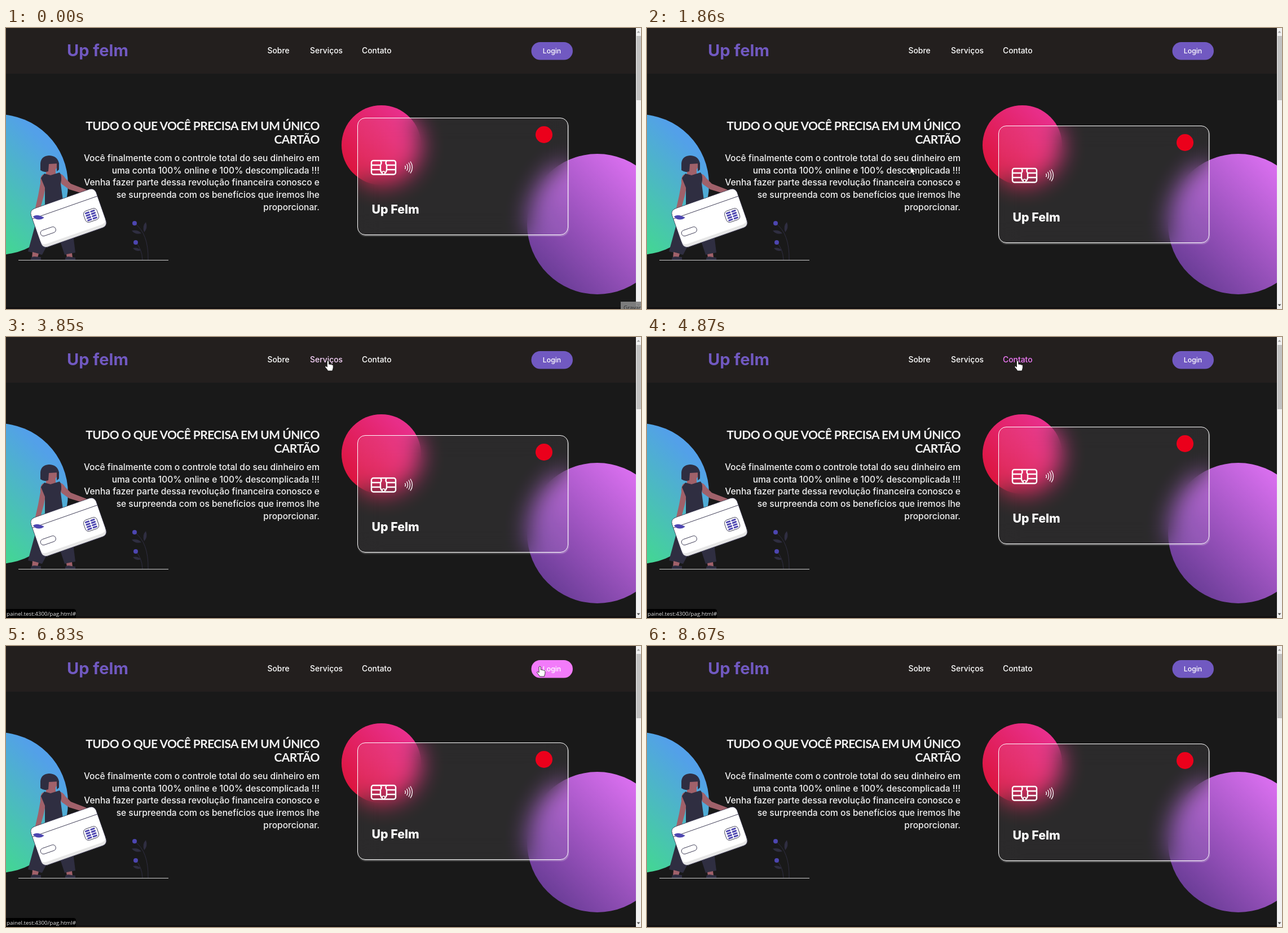
Animation of 1126x498 px, one loop 8.73 s. Source, as an HTML page:

```html
<!DOCTYPE html>
<html lang="pt-BR">
<head>
<meta charset="utf-8">
<title>Cartão</title>
<style>
html, body { margin: 0; width: 100%; height: 100%; overflow: hidden; background: #191919; }
#stage { position: relative; width: 1126px; height: 498px; overflow: hidden; background: #191919; }
svg { position: absolute; left: 0; top: 0; display: block; font-family: Inter, sans-serif; }
.ball { position: absolute; border-radius: 50%; }
#green { left: -139px; top: 153px; width: 249px; height: 249px; background: linear-gradient(45deg, #3ee878 12%, #53a0e9 82%); }
#red { left: 595px; top: 137px; width: 141px; height: 141px; background: linear-gradient(45deg, #dc143c 12%, #e93191 88%); }
#purple { left: 924px; top: 223px; width: 249px; height: 249px; background: linear-gradient(45deg, #643a92 10%, #e072f4 88%); }
#card {
  position: absolute; left: 623px; top: 0; width: 374px; height: 208px; box-sizing: border-box;
  border: 1px solid #fff; border-radius: 14px; background: rgba(250,238,255,.08);
  box-shadow: 1px 2px 2px rgba(255,255,255,.32);
  -webkit-backdrop-filter: blur(20px); backdrop-filter: blur(20px);
}
#card svg { left: -1px; top: -1px; }
.nav { font-size: 13.9px; font-weight: 500; }
.head { font: 700 21px Lato, sans-serif; letter-spacing: -.55px; }
.body { font-size: 15.55px; font-weight: 500; }
.small { font: 9.8px "Open Sans", sans-serif; }
</style>
</head>
<body>
<div id="stage">
  <div class="ball" id="green"></div>
  <div class="ball" id="red"></div>
  <div class="ball" id="purple"></div>

  <svg width="1126" height="498" viewBox="0 0 1126 498">
    <rect width="1126" height="81" fill="#231f1e"/>
    <rect y="495" width="1126" height="3" fill="#121011"/>
    <text x="108" y="50" font-size="29" font-weight="700" fill="#7159c1">Up felm</text>
    <g class="nav" fill="#fff">
      <text id="about" x="463.5" y="45">Sobre</text>
      <text id="services" x="539" y="45">Serviços</text>
      <text id="contact" x="631" y="45">Contato</text>
    </g>
    <rect id="login" x="931.5" y="25" width="73.5" height="31.5" rx="15.7" fill="#7159c1"/>
    <text x="968" y="44.5" text-anchor="middle" font-size="12.3" font-weight="500" fill="#fff">Login</text>

    <g class="head" fill="#f2f2f2" text-anchor="end">
      <text x="556" y="180.5">TUDO O QUE VOCÊ PRECISA EM UM ÚNICO</text>
      <text x="556" y="204.5">CARTÃO</text>
    </g>
    <g class="body" id="copy" fill="#f2f2f2" text-anchor="end"></g>

    <!-- woman -->
    <g fill="#2f2e41">
      <path d="M51 352L39 396L64 402L82 368Z"/>
      <path d="M92 366L104 402L123 398L119 366Z"/>
    </g>
    <g fill="#a0616a">
      <path d="M47 397L58 400L56 407H46Z"/>
      <path d="M107 401L117 399L118 407H108Z"/>
      <path d="M71 246H88V262H71Z"/>
      <path d="M95 258Q101 259 105 266L115 276L146 288L142 295L112 286L98 276Z"/>
      <path d="M66 259Q60 263 61 275L57 297L52 319L60 323L67 297L72 272Z"/>
    </g>
    <g fill="#2f2e41">
      <path d="M44 411Q43 405 50 405L62 406V411Z"/>
      <path d="M105 411Q104 405 111 405L123 407V411Z"/>
      <path d="M68 258L79 261L95 256Q100 262 97 276L101 306L69 316L69 283L62 266Z"/>
    </g>
    <circle cx="83" cy="244" r="8" fill="#a0616a"/>
    <path d="M61 252V240Q62 227 76 226Q91 226 94 240L76 241L75 254Q68 257 61 252ZM90 239H94V251L90 254Z" fill="#2f2e41"/>

    <!-- card she carries -->
    <g transform="translate(111 337) rotate(-19.3)" stroke="#3f3d56" stroke-width=".9">
      <rect x="-61" y="-36" width="122" height="72" rx="9" fill="#e6e6e6"/>
      <path d="M-60.6 -26Q-60.6 -35.6 -51 -35.6H51Q60.6 -35.6 60.6 -26V22Q60.6 30 52 30H-52Q-60.6 30 -60.6 22Z" fill="#fff" stroke="none"/>
      <path d="M-61 -20H61" fill="none"/>
      <path d="M-59 -22Q-54 -29 -39 -24Q-45 -17 -54 -19Z" transform="translate(-1 3) rotate(30 -50 -22)" fill="#4d46b0" stroke="none"/>
      <rect x="-56" y="5" width="28" height="10.5" rx="5" fill="none"/>
      <rect x="27" y="-2" width="25" height="21" rx="6" fill="#fff"/>
      <g id="bars" fill="#4d46b0" stroke="none"></g>
    </g>

    <!-- plant -->
    <g fill="none" stroke="#2f2e41">
      <path d="M252 411Q253 364 228 346M242 411Q241 391 230 380"/>
      <g fill="#2f2e41" stroke="none">
        <path d="M245 362Q241 351 248 344Q252 354 245 362Z"/>
        <path d="M240 364Q229 367 223 359Q234 357 240 364Z"/>
        <path d="M239 394Q230 397 225 390Q234 388 239 394Z"/>
      </g>
    </g>
    <g fill="#4d46b0"><circle cx="228" cy="346" r="4"/><circle cx="230" cy="380" r="4"/></g>
    <path d="M22 411.5H288" stroke="#ccc"/>
  </svg>

  <div id="card">
    <svg width="374" height="208" viewBox="0 0 374 208">
      <circle cx="331" cy="30" r="15" fill="#eb001b"/>
      <g fill="none" stroke="#fff" stroke-width="2.4">
        <rect x="25" y="76" width="43" height="24.5" rx="3.5"/>
        <path d="M25 84H40M25 92H40M53 84H68M53 92H68M41 76Q44 80 41 84V93Q42 97 44 98M52 76Q49 80 52 84V93Q51 97 49 98"/>
        <circle cx="46.5" cy="97.5" r="2.5" stroke-width="1.6"/>
        <path d="M84.5 85Q86.5 88 84.5 91M87.5 82Q91.5 88 87.5 94M91 79.5Q96 88 91 96.5M94 77.5Q101 88 94 98.5" stroke-width="1.3"/>
      </g>
      <text x="25.5" y="170" font-size="21.3" font-weight="800" fill="#fff">Up Felm</text>
    </svg>
  </div>

  <svg width="1126" height="498" viewBox="0 0 1126 498">
    <rect x="1117" width="9" height="498" fill="#f1f1f1"/>
    <rect x="1118" y="14" width="8" height="114" fill="#c1c1c1"/>
    <path d="M1118.5 8.5L1121.5 5L1124.5 8.5Z" fill="#a3a3a3"/>
    <path d="M1118.5 489.5L1121.5 493L1124.5 489.5Z" fill="#505050"/>
    <g id="tip">
      <rect x="1090" y="485" width="36" height="13" fill="#858585" opacity=".92"/>
      <text class="small" x="1095" y="499" fill="#2a2a2a">Gravar</text>
    </g>
    <g id="status">
      <path d="M0 482H120Q124 482 124 486V498H0Z" fill="#000"/>
      <text class="small" x="1" y="493.5" fill="#e8e8e8">painel.test:4300/pag.html#</text>
    </g>
    <g id="cursor" stroke="#111" stroke-width=".8" fill="#fff" stroke-linejoin="round">
      <path id="arrow" d="M0 0V13.2L3 10.4L5 15.2L7.3 14.2L5.3 9.6H9.2Z"/>
      <path id="hand" d="M-1.6 1Q0 -1 1.6 1V6.3Q3 5.4 4.2 6.7Q5.6 6 6.7 7.3Q8.6 6.8 9.2 8.6V12.5Q8.8 15 7.6 18H-.2Q-2 14.6 -5 11.6Q-5.6 9.4 -3.6 9.6L-1.6 11.2Z"/>
    </g>
  </svg>
</div>

<script>
const LOOP = 8730;
const $ = id => document.getElementById(id);
const SVG = "http://www.w3.org/2000/svg";

function add(parent, tag, attrs, label) {
  const el = document.createElementNS(SVG, tag);
  for (const k in attrs) el.setAttribute(k, attrs[k]);
  if (label) el.textContent = label;
  parent.appendChild(el);
}

[
  "Você finalmente com o controle total do seu dinheiro em",
  "uma conta 100% online e 100% descomplicada !!!",
  "Venha fazer parte dessa revolução financeira conosco e",
  "se surpreenda com os benefícios que iremos lhe",
  "proporcionar."
].forEach((line, i) => add($("copy"), "text", { x: 556, y: 236 + i * 21.7 }, line));

for (let i = 0; i < 8; i++) {
  add($("bars"), "rect", { x: 30 + (i % 2) * 10, y: .6 + (i >> 1) * 4.4, width: 8.5, height: 3, rx: 1.3 });
}

// Linear value from rows of [time, v1, v2, ...]
function at(rows, t) {
  const n = rows.findIndex(r => r[0] > t);
  if (n === 0) return rows[0].slice(1);
  if (n < 0) return rows[rows.length - 1].slice(1);
  const a = rows[n - 1], b = rows[n], k = (t - a[0]) / (b[0] - a[0]);
  return a.slice(1).map((v, i) => v + (b[i + 1] - v) * k);
}

// Ramp up between a and b, down between c and d
const pulse = (t, a, b, c, d) => at([[a, 0], [b, 1], [c, 1], [d, 0]], t)[0];

const path = [
  [500, 720, 505], [680, 627, 462], [860, 560, 447], [1000, 515, 435], [1120, 512, 432],
  [1370, 446, 421], [1550, 445, 370], [1900, 470, 230], [2280, 496, 92], [2440, 501, 48],
  [2560, 501, 32], [3150, 501, 38], [3400, 512, 44], [3650, 548, 46], [3850, 571, 42],
  [4300, 576, 42], [4600, 650, 42], [4980, 660, 42], [5200, 735, 41], [5420, 780, 41],
  [5700, 875, 40], [5870, 911, 38], [6080, 945, 36], [6950, 947, 36], [7200, 990, 42],
  [7420, 1034, 44], [7620, 985, 70], [7760, 1003, 105], [8020, 1068, 310],
  [8170, 1088, 430], [8300, 1094, 500]
];
const links = [[2420, 3270], [3650, 4360], [4540, 5040], [5960, 7200]];
const hover = {
  about: [2440, 2760, 3200, 3450],
  services: [3770, 4040, 4300, 4550],
  contact: [4540, 4800, 5020, 5270]
};
const blend = (from, to, k) =>
  `rgb(${from.map((v, i) => Math.round(v + (to[i] - v) * k)).join(",")})`;
const PINK = [242, 123, 250];

function draw() {
  const t = performance.now() % LOOP;

  // The card floats up and down in whole pixels
  const top = Math.floor(165.3 - 10.2 * Math.cos(Math.PI * (t - 385) / 1217));
  $("card").style.transform = `translateY(${top}px)`;

  for (const id in hover) $(id).setAttribute("fill", blend([255, 255, 255], PINK, pulse(t, ...hover[id])));
  $("login").setAttribute("fill", blend([113, 89, 193], PINK, pulse(t, 5960, 6200, 7190, 7420)));

  $("tip").setAttribute("opacity", pulse(t, -2, -1, 90, 260));
  $("status").setAttribute("opacity", Math.max(pulse(t, 2780, 2920, 5780, 5900), pulse(t, 6050, 6170, 7560, 7760)));

  const [x, y] = at(path, t);
  const onLink = links.some(([a, b]) => t >= a && t < b);
  $("cursor").setAttribute("transform", `translate(${x.toFixed(1)} ${y.toFixed(1)})`);
  $("arrow").style.display = onLink ? "none" : "";
  $("hand").style.display = onLink ? "" : "none";
  requestAnimationFrame(draw);
}
draw();
</script>
</body>
</html>
```
